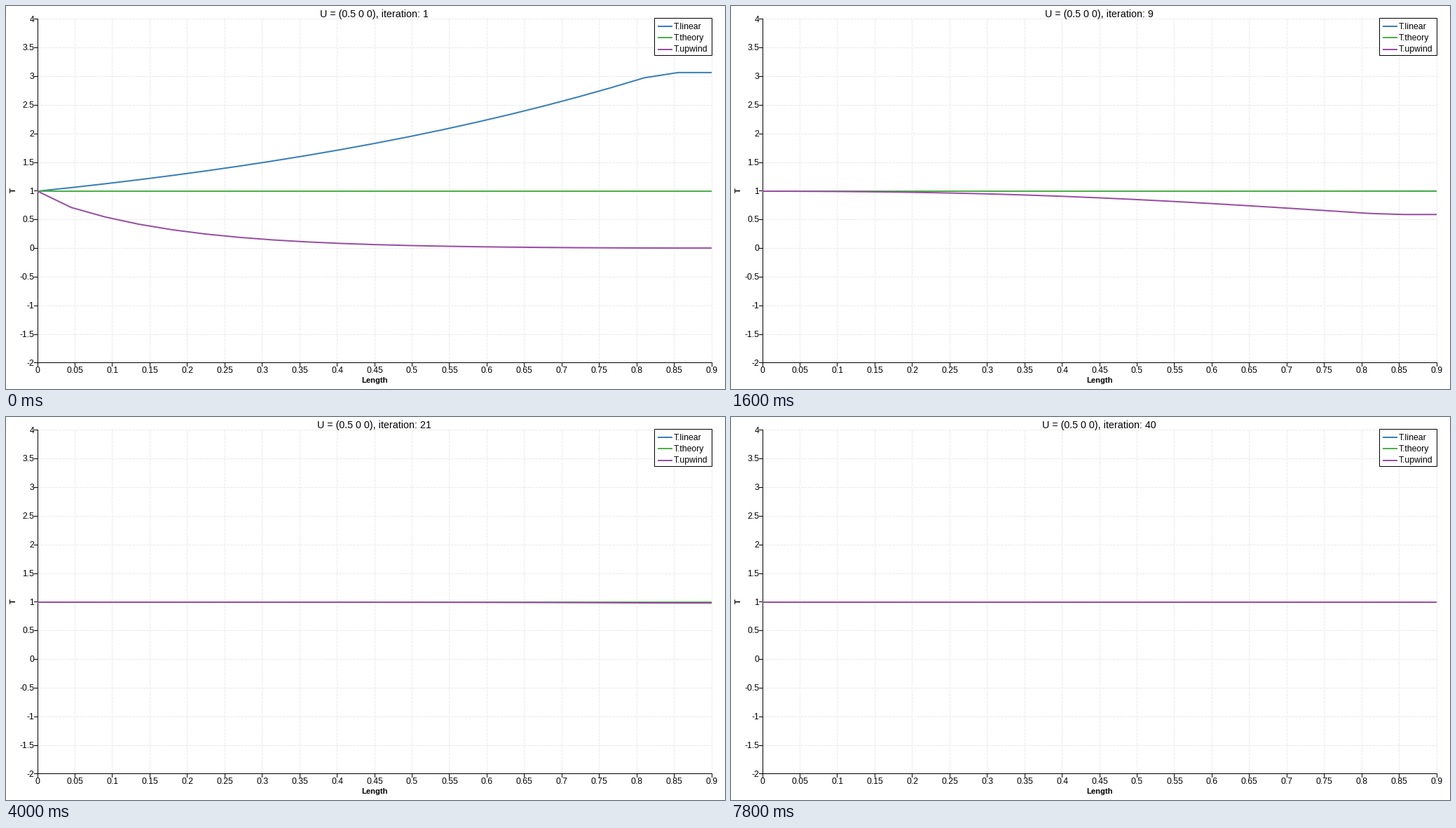
Write a matplotlib script that moves like this. It is 1026x546 px and loops after 8000 ms.

```python
import math

import numpy as np
import matplotlib.pyplot as plt
from matplotlib.animation import FuncAnimation
from matplotlib.patches import Rectangle

W, H, DPI = 1026, 546, 72          # at 72 dpi one point is one pixel
LEFT, RIGHT, TOP, BOTTOM = 45, 1007, 19, 509
STEPS = 40
BLUE, GREEN, PURPLE = "#377eb8", "#4daf4a", "#984ea3"

plt.rcParams["font.family"] = "Liberation Sans"
fig = plt.figure(figsize=(W / DPI, H / DPI), dpi=DPI, facecolor="white")
ax = fig.add_axes([0, 0, 1, 1])
ax.set_xlim(0, W)
ax.set_ylim(H, 0)
ax.axis("off")


def px(x):
    return LEFT + x / 0.9 * (RIGHT - LEFT)


def py(t):
    return TOP + (4 - t) / 6 * (BOTTOM - TOP)


def column(x):
    """Centre of the pixel column that a thin vertical line fills."""
    return math.floor(round(x, 6)) + 0.5


def row(y):
    """Centre of the pixel row that a thin horizontal line fills."""
    return math.ceil(round(y, 6)) - 0.5


def line(xs, ys, color="black", width=1, **kw):
    return ax.plot(xs, ys, color=color, lw=width, snap=False,
                   solid_capstyle="butt", **kw)[0]


def label(x, y, text, size=12, ha="center", **kw):
    return ax.text(x, y, text, fontsize=size, ha=ha,
                   va=kw.pop("va", "baseline"), **kw)


def series(k, ratio, n):
    """Solution after n implicit sweeps, k effective cells from the inlet."""
    term = np.ones_like(k)
    total = term.copy()
    for j in range(1, n):
        term = term * (k + j - 1) / j * (1 - ratio)
        total = total + term
    return ratio ** k * total


# grid, ticks and tick labels
grid = dict(color="0.92", dashes=(4, 1), zorder=1)
for x in np.arange(19) * 0.05:
    cx = column(px(x))
    line([cx, cx], [TOP, BOTTOM], **grid)
    line([cx, cx], [BOTTOM, BOTTOM + 5], zorder=3)
    label(px(x), 523.3, f"{x:g}", 12.3)
for t in np.arange(-2, 4.5, 0.5):
    cy = row(py(t))
    line([LEFT, RIGHT], [cy, cy], **grid)
    line([LEFT - 5, LEFT], [cy, cy], zorder=3)
    label(40, py(t) + 3.6, f"{t:g}", 12.1, ha="right")
line([column(LEFT)] * 2, [TOP - 1, BOTTOM], zorder=3)
line([LEFT, RIGHT + 1], [row(BOTTOM)] * 2, zorder=3)

label(526.3, 537.3, "Length", 11.2, weight="bold")
label(10.5, 262.5, "T", 11.2, weight="bold", rotation=90, va="center")
title = label(525.7, 16, "", 14.3)

# curves: the outlet half cell is flat
cells = np.arange(21)
xs = px(cells * 0.045)
pos = np.minimum(cells, 18.5)
k_linear = 6.4 * pos / 18.5
k_upwind = np.where(pos > 0, 0.282 * pos + 0.078, 0)
growth = 3.071 ** (1 / 6.4)

linear = line(xs, xs, BLUE, 2, zorder=4)
line([LEFT, RIGHT], [py(1)] * 2, GREEN, 2, zorder=5)
upwind = line(xs, xs, PURPLE, 2, zorder=6)

# legend
ax.add_patch(Rectangle((925.5, 17.5), 82, 53, fc="white", ec="black",
                       lw=1, snap=False, zorder=7))
entries = [("T.linear", BLUE), ("T.theory", GREEN), ("T.upwind", PURPLE)]
for i, (name, color) in enumerate(entries):
    y = 29 + 16.3 * i
    line([930, 951], [round(y)] * 2, color, 2, zorder=8)
    label(953, y + 3.8, name, 12.2, ha="left", zorder=8)


def update(i):
    n = i + 1
    title.set_text(f"U = (0.5 0 0), iteration: {n}")
    linear.set_ydata(py(series(k_linear, growth, n)))
    upwind.set_ydata(py(series(k_upwind, 0.395, n)))
    return title, linear, upwind


anim = FuncAnimation(fig, update, frames=STEPS, interval=200, repeat=True,
                     repeat_delay=0, blit=False)
plt.show()
```
